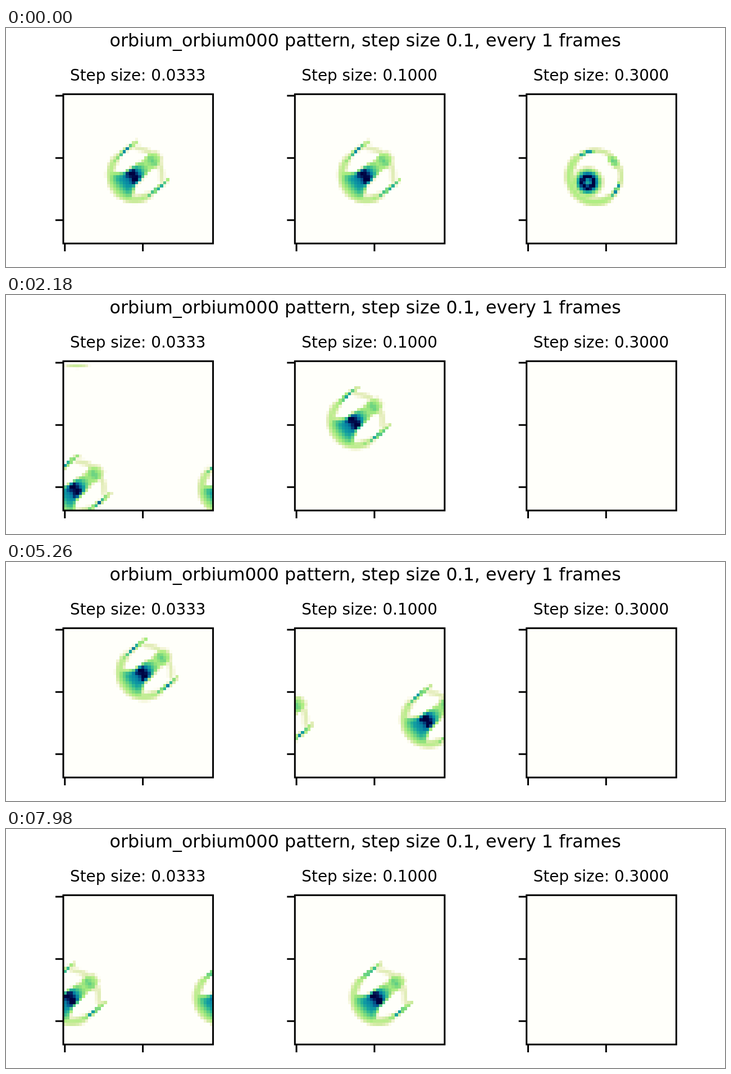
These frames come from a looping animation (1280x427 px, 8000 ms). An HTML page with a canvas:

```html
<!DOCTYPE html>
<html lang="en">
<head>
<meta charset="utf-8">
<title>Step size comparison</title>
<style>
  html, body { margin: 0; width: 100%; height: 100%; overflow: hidden; background: #fff; }
  canvas, svg { position: absolute; left: 0; top: 0; width: 1280px; height: 427px; }
  text { font-family: "DejaVu Sans", sans-serif; text-anchor: middle; fill: #000; }
  path { fill: none; stroke: #000; stroke-width: 3; }
</style>
</head>
<body>
<canvas width="1280" height="427"></canvas>
<svg viewBox="0 0 1280 427">
  <text x="639.7" y="33" font-size="31.75">orbium_orbium000 pattern, step size 0.1, every 1 frames</text>
</svg>
<script>
const LOOP = 8000, STEP = 20, N = 48, CELL = 5.554, TOP = 118.3;
const AXIS = [-0.775, 0.632];   // direction of travel

const clamp = v => Math.max(0, Math.min(1, v));
const bump = u => Math.max(0, 1 - u * u);
const tent = u => Math.max(0, 1 - Math.abs(u));
const wrap = v => ((v % N) + N) % N;

// Piecewise linear curve through [x0, y0, x1, y1, ...]
function curve(x, p) {
  if (x <= p[0]) return p[1];
  for (let i = 2; i < p.length; i += 2) {
    if (x <= p[i]) {
      const k = (x - p[i - 2]) / (p[i] - p[i - 2]);
      return p[i - 1] + (p[i + 1] - p[i - 1]) * k;
    }
  }
  return p[p.length - 1];
}

const SPINE = [-10.9, 0, -9.4, 0.28, -7.2, 0.5, -5, 0.33, -2.8, 0.57, -0.8, 0.92,
  0.4, 1, 1.5, 0.95, 2.6, 0.82, 4.8, 0.68, 7, 0.42, 8.4, 0.24, 9.6, 0];
const HALF = [-11, 1.8, -7.5, 2.9, -5, 2.4, -2, 2.8, 2, 3.2, 4, 4.6, 5.5, 6.3, 7, 6, 9.6, 2.5];
const RIM = [-9, 0.18, -5.5, 0.15, -4.3, 0, -1, 0, 2, 0.27, 9, 0.27];
const WING = [-8, 0.2, -5.5, 0.55, -2.5, 0.9, 0, 0.6, 3, 0.3, 4, 0];

// Density of the steady glider; f runs forward, s sideways
function glider(f, s) {
  const r = Math.hypot(f, s), side = Math.abs(s);
  const front = clamp((f + 3) / 4);
  const rim = curve(f, RIM) * bump((r - 8.6 + 0.7 * front) / (1.2 + 0.5 * front));
  let wing = 0;
  if (f > -7.9 && f < 4) {
    const line = f > 0 ? Math.sqrt(62.4 - f * f) : 7.9 + 0.2 * bump((f + 3.5) / 3.5);
    wing = curve(f, WING) * tent((side - line) / 0.85);
  }
  const ridge = 0.2 * bump((f - 0.9) / 2.4) * Math.exp(-(((side - 1.8) / 0.8) ** 2));
  const q = side / curve(f, HALF);
  const body = (curve(f, SPINE) + ridge) * Math.max(0, 1 - q ** 3.5);
  return Math.max(rim, wing, body);
}

const CORE = [0, 0.6, 0.8, 0.75, 1.5, 1, 2.2, 1, 3, 0.75, 4.2, 0.3, 5.5, 0];

// Density of the unstable, rounder shape
function ringed(f, s) {
  const r = Math.hypot(f, s), front = clamp((f + 2) / 4);
  const rim = (0.22 + 0.08 * front) * bump((r - 8.3) / (1.1 + 0.7 * front));
  const patch = 0.5 * bump(Math.hypot((f + 7.6) / 1.8, s / 3));
  const wing = Math.abs(s) > 4 ? 0.98 * tent((r - 8.1) / 0.8) * bump((f + 2.3) / 3.2) : 0;
  return Math.max(rim, patch, wing, curve(Math.hypot(f - 3, s), CORE));
}

const STOPS = [0, "fffffa", 0.08, "f5f6dc", 0.15, "e4edbb", 0.22, "cdeb9e", 0.3, "aeee82",
  0.4, "8ee07c", 0.5, "5fcf85", 0.6, "2fb892", 0.7, "109aa2", 0.8, "0580a2",
  0.88, "045a92", 0.94, "032c6b", 1, "00003f"];
const CHANNELS = [0, 2, 4].map(c =>
  STOPS.map((v, i) => i % 2 ? parseInt(v.slice(c, c + 2), 16) : v));
const PALETTE = Array.from({ length: 256 }, (_, i) =>
  `rgb(${CHANNELS.map(ch => Math.round(curve(i / 255, ch))).join()})`);

// Start in cells, speed in cells per ms
const PANELS = [
  { left: 102, label: "0.0333", shape: glider, x: 22.95, y: 25.95, vx: -0.00855, vy: 0.00688 },
  { left: 514.3, label: "0.1000", shape: glider, x: 22.9, y: 26, vx: -0.02358, vy: 0.0189 },
  { left: 926.7, label: "0.3000", shape: ringed, x: 22, y: 26.4, vx: -0.06, vy: 0.048,
    fadeAt: 300, fade: 80 }
];

const svg = document.querySelector("svg");
function add(tag, attrs, text = "") {
  const el = document.createElementNS(svg.namespaceURI, tag);
  for (const k in attrs) el.setAttribute(k, attrs[k]);
  el.textContent = text;
  svg.append(el);
}

for (const p of PANELS) {
  const size = N * CELL, bottom = TOP + size;
  let d = `M${p.left} ${TOP}h${size}v${size}h${-size}z`;
  for (const k of [0, 20, 40]) d += `M${p.left} ${TOP + (k + 0.5) * CELL}h-14`;
  for (const k of [0, 25]) d += `M${p.left + (k + 0.5) * CELL} ${bottom}v14`;
  add("path", { d });
  add("text", { x: p.left + size / 2 - 0.5, y: 94, "font-size": 27.8 }, "Step size: " + p.label);
}

const ctx = document.querySelector("canvas").getContext("2d");

function drawPanel(p, t) {
  const edge = (start, k) => Math.round(start + k * CELL);
  const loss = p.fade ? clamp((t - p.fadeAt) / p.fade) : 0;
  const cx = p.x + p.vx * t, cy = p.y + p.vy * t;
  ctx.fillStyle = PALETTE[0];
  ctx.fillRect(p.left, TOP, N * CELL, N * CELL);
  if (loss === 1) return;
  // The top row always stays empty
  for (let row = 1; row < N; row++) {
    const dy = wrap(row + 0.5 - cy + N / 2) - N / 2;
    const y = edge(TOP, row), h = edge(TOP, row + 1) - y;
    for (let col = 0; col < N; col++) {
      const dx = wrap(col + 0.5 - cx + N / 2) - N / 2;
      if (dx * dx + dy * dy > 150) continue;
      const f = dx * AXIS[0] + dy * AXIS[1];
      const s = -dx * AXIS[0] * 0 + dx * AXIS[1] - dy * AXIS[0];
      const v = clamp(p.shape(f, s) - loss);
      if (v < 0.01) continue;
      const x = edge(p.left, col);
      ctx.fillStyle = PALETTE[Math.round(v * 255)];
      ctx.fillRect(x, y, edge(p.left, col + 1) - x, h);
    }
  }
}

const began = performance.now();
function frame() {
  const t = Math.floor(((performance.now() - began) % LOOP) / STEP) * STEP;
  ctx.clearRect(0, 0, 1280, 427);
  for (const p of PANELS) drawPanel(p, t);
  requestAnimationFrame(frame);
}
frame();
</script>
</body>
</html>
```
